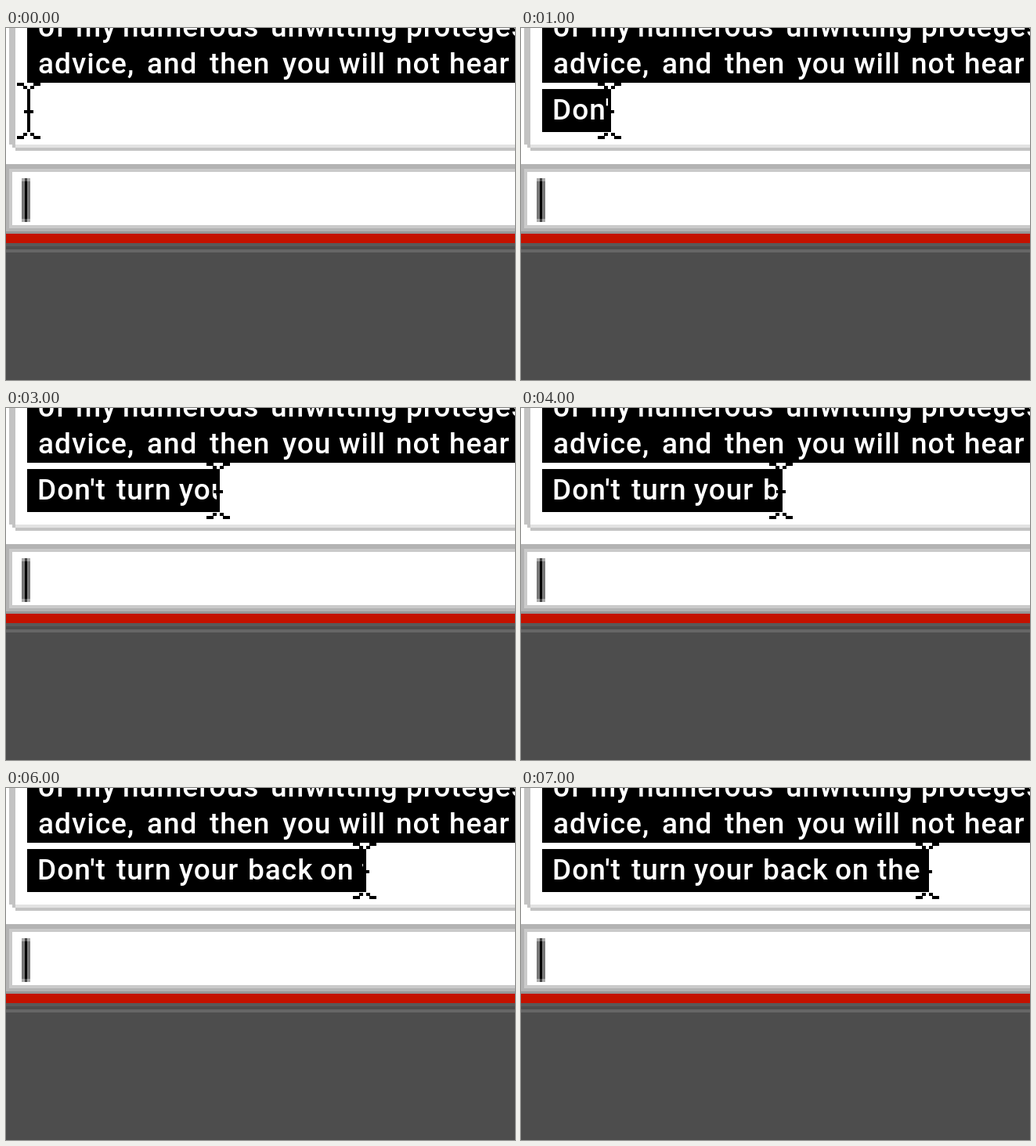
Write an HTML page with a canvas that moves like this. It is 650x450 px and loops after 8 s.

```html
<!DOCTYPE html>
<html lang="en">
<head>
<meta charset="utf-8">
<title>Text selection</title>
<style>
  html, body { margin: 0; width: 100%; height: 100%; overflow: hidden; background: #fff; }
  canvas { display: block; }
</style>
</head>
<body>
<canvas id="stage" width="650" height="450"></canvas>
<script>
const ctx = document.getElementById('stage').getContext('2d');
const LOOP = 8000, STEP = 1000;
const pointerX = [29, 113, 211, 271, 332, 396, 458, 519];

// Each line has a baseline and words with their left edges.
const lines = [
  { y: 11, words: { of: 41, my: 89, numerous: 149, unwitting: 338, proteges: 511 } },
  { y: 58, words: { 'advice,': 41, and: 180, then: 260, you: 353, will: 425, not: 498, hear: 566 } },
  { y: 117, words: { "Don't": 40, turn: 141, your: 221, back: 309, on: 401, the: 455 } }
];

function rect(color, left, top, right, bottom) {
  ctx.fillStyle = color;
  ctx.fillRect(left, top, right - left, bottom - top);
}

function drawPanels() {
  rect('#fff', 0, 0, 650, 450);

  // Message box border
  rect('#c3c3c3', 4, 0, 12, 149);
  rect('#c3c3c3', 8, 149, 12, 153);
  rect('#e2e2e2', 12, 149, 650, 153);
  rect('#c3c3c3', 12, 153, 650, 157);

  // Input field
  rect('#b3b3b3', 0, 174, 650, 260);
  rect('#cacaca', 4, 180, 650, 256);
  rect('#fff', 8, 184, 650, 252);
  rect('#969696', 0, 260, 650, 263);

  // Red rule and footer
  rect('#c41200', 0, 263, 650, 275);
  rect('#4d4d4d', 0, 275, 650, 450);
  rect('#595959', 0, 275, 650, 279);
  rect('#666', 0, 283, 650, 287);

  // Input caret
  rect('#aaa', 20, 192, 31, 248);
  rect('#777', 20, 196, 31, 244);
  rect('#444', 24, 192, 27, 248);
  rect('#000', 24, 196, 27, 244);
}

function drawText() {
  ctx.font = '500 37px Roboto, sans-serif';
  ctx.letterSpacing = '1px';
  ctx.fillStyle = '#fff';
  for (const { y, words } of lines)
    for (const [word, x] of Object.entries(words)) ctx.fillText(word, x, y);
}

function drawPointer(x) {
  const part = (left, top, right, bottom) => rect('#000', x + left, top, x + right, bottom);
  part(-2, 78, 2, 133);
  part(-6, 105, 6, 109);
  for (const [outer, inner] of [[70, 74], [138, 134]]) {
    part(-15, outer, -6, outer + 4);
    part(6, outer, 15, outer + 4);
    part(-7, inner, -2, inner + 4);
    part(2, inner, 7, inner + 4);
  }
}

function draw(now) {
  const step = Math.floor((now % LOOP) / STEP);
  const x = pointerX[step];
  drawPanels();
  rect('#000', 27, 0, 650, 70);
  if (step) rect('#000', 27, 78, x + 2, 133);
  drawText();
  drawPointer(x);
  requestAnimationFrame(draw);
}
draw(performance.now());
</script>
</body>
</html>
```
